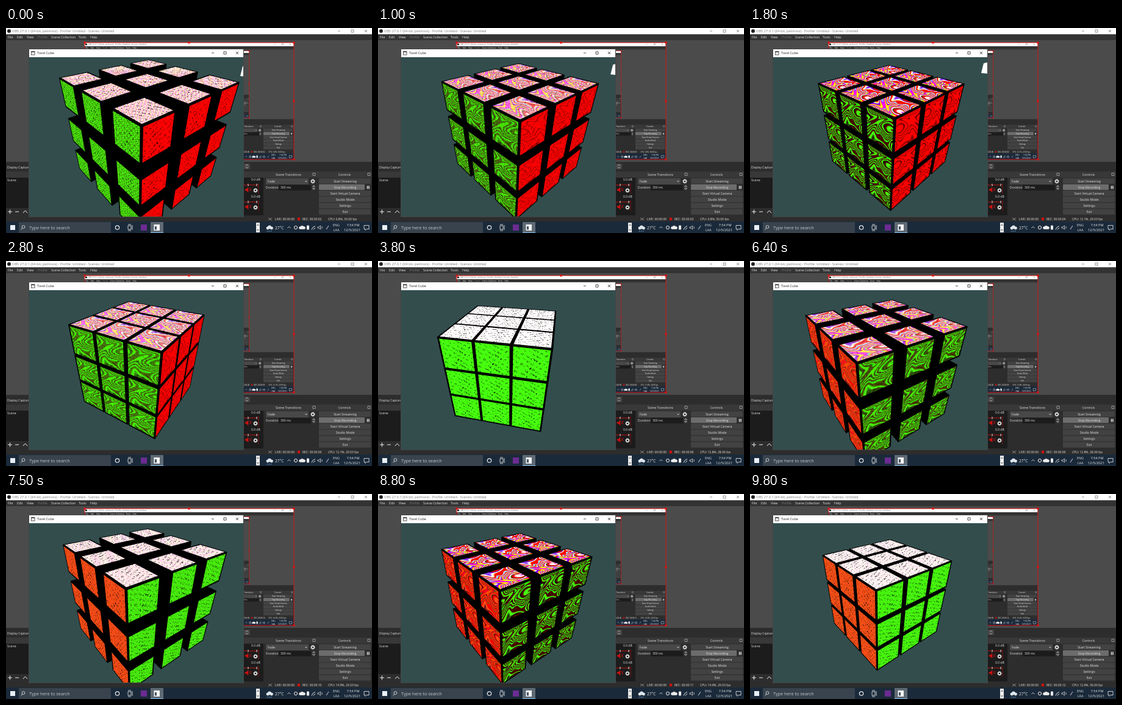
These frames come from a looping animation (600 by 337 pixels, 9.9 s). An HTML page with a canvas:

```html
<!DOCTYPE html>
<html>
<head>
<meta charset="utf-8">
<style>
html, body { margin: 0; width: 100%; height: 100%; overflow: hidden; background: #000; }
svg { position: absolute; left: 0; top: 0; display: block; font-family: "Open Sans", sans-serif; }
canvas { position: absolute; left: 38px; top: 48px; }
</style>
</head>
<body>
<svg id="desk" width="600" height="337" viewBox="0 0 600 337"></svg>
<canvas id="view" width="351" height="262"></canvas>
<script>
const LOOP = 9900, STEP = 100;

// ---------- desktop ----------
const rect = (x, y, w, h, fill, more = '') =>
  `<rect x="${x}" y="${y}" width="${w}" height="${h}" fill="${fill}" ${more}/>`;
const text = (x, y, s, size = 5.3, fill = '#e4e4e4', more = '') =>
  `<text x="${x}" y="${y}" font-size="${size}" fill="${fill}" ${more}>${s}</text>`;
const mid = (x, y, s, size, fill) => text(x, y, s, size, fill, 'text-anchor="middle"');
const line = (d, stroke = '#e4e4e4', w = 0.8, fill = 'none') =>
  `<path d="${d}" stroke="${stroke}" stroke-width="${w}" fill="${fill}"/>`;
const dot = (x, y, r, fill, more = '') => `<circle cx="${x}" cy="${y}" r="${r}" fill="${fill}" ${more}/>`;
const gear = (x, y) =>
  dot(x, y, 2.2, 'none', 'stroke="#eee" stroke-width="1.4"') +
  dot(x, y, 3.2, 'none', 'stroke="#eee" stroke-width="1" stroke-dasharray="1.3 1.2"');
const winButtons = (xs, y, c) =>
  line(`M${xs[0] - 2} ${y}h4`, c) +
  line(`M${xs[1] - 2} ${y - 2}h4v4h-4z`, c) +
  line(`M${xs[2] - 2} ${y - 2}l4 4m0 -4l-4 4`, c);

function titleBar() {
  const menu = [[3, 'File'], [18, 'Edit'], [34, 'View'], [52, 'Profile'],
    [74, 'Scene Collection'], [119, 'Tools'], [138, 'Help']];
  return rect(0, 0, 600, 10.5, '#fff') +
    dot(5, 5, 3, '#222') +
    text(10, 7.2, 'OBS 27.0.1 (64-bit, pelmora) - Profile: Untitled - Scenes: Untitled', 5.7, '#777') +
    winButtons([546, 568, 590], 5, '#777') +
    rect(0, 10.5, 600, 9.5, '#333') +
    menu.map(([x, s]) => text(x, 17, s, 5.3, s === 'Profile' ? '#777' : '#e4e4e4')).join('');
}

function mixer(y) {
  return text(402, y, '0.0 dB', 5) +
    line(`M390 ${y + 7}h24`, '#a01818', 1.2) +
    line(`M397 ${y + 5}v4M411 ${y + 5}v4`, '#ddd', 1) +
    line(`M392 ${y + 14}h2l3 -3v8l-3 -3h-2z`, '#d01010', 0.5, '#d01010') +
    line(`M399 ${y + 12}l3 5m0 -5l-3 5`, '#d01010') +
    gear(409, y + 16) + line(`M414 ${y + 4}v18`, '#7a1515', 1);
}

function docks() {
  const buttons = ['Start Streaming', 'Stop Recording', 'Start Virtual Camera', 'Studio Mode', 'Settings', 'Exit'];
  return rect(0, 220, 600, 98, '#2d2d2d') +
    rect(0, 236, 600, 10, '#383838') +
    text(2, 231, 'Display Capture', 5) +
    rect(390, 223, 10, 9, '#444') + line('M393 226.500l2 -2l2 2m-4 2l2 2l2 -2') +
    rect(0, 246, 38, 50, '#1c1c1c') + text(2, 252, 'Scene') +
    line('M3 302h7m-3.500 -3.500v7M15 302h6M28 304l3.500 -4l3.500 4', '#eee', 1) +
    rect(388, 246, 34, 62, '#1c1c1c') + mixer(251) + mixer(279) +
    mid(463, 243, 'Scene Transitions', 5.2) + mid(555, 243, 'Controls', 5.2) +
    line('M503 238.500h4v4h-4zM593 238.500h4v4h-4z', '#bbb', 0.7) +
    rect(426, 247, 70, 10, '#484848') + text(429, 254, 'Fade') +
    line('M490.500 251l1.500 2l1.500 -2') + gear(503, 252) +
    text(426, 264, 'Duration', 5) + rect(447, 258, 53, 9, '#1c1c1c') + text(450, 264.2, '300 ms', 5) +
    line('M502.500 261l2 -2.500l2 2.500zM502.500 263.500l2 2.500l2 -2.500z', '#ccc', 0.7) +
    buttons.map((s, i) => {
      const on = i === 1;
      return rect(513, 247 + i * 10.1, on ? 75 : 85, 9.2, on ? '#6c6c6c' : '#424242', 'rx="1"') +
        mid(556, 253.6 + i * 10.1, s, 5.2);
    }).join('') +
    line('M592.500 259.500v5M595 259.500v5', '#eee', 1.4) +
    line('M430 312l6 4m-6 0l6 -4', '#aaa', 0.7) + text(441, 316, 'LIVE: 00:00:00', 5) +
    dot(480, 314, 2.4, '#d01010') + text(486, 316, '', 5, '#e4e4e4', 'class="rec"') +
    text(528, 316, '', 5, '#e4e4e4', 'class="cpu"');
}

function taskbar() {
  return rect(0, 318, 600, 19, '#1b2a3a') +
    rect(7, 324, 8, 8, '#e8f0f8') +
    rect(21, 319, 151, 18, '#38434e') +
    dot(28.5, 327, 2.4, 'none', 'stroke="#ddd" stroke-width=".9"') + line('M26.800 329l-2 2.500', '#ddd', 0.9) +
    text(38, 330.6, 'Type here to search', 7.3, '#c4c8cc') +
    dot(182.500, 328, 3.2, 'none', 'stroke="#eee" stroke-width="1.2"') +
    line('M200 325h5v6h-5zM207 324v8M200 323h5M200 333h5', '#ddd', 0.9) +
    rect(221, 323, 10, 10, '#6b2c91') +
    rect(237, 319, 21, 18, '#5f6a74') + rect(237, 336, 21, 1, '#76b9ed') +
    rect(242.500, 323, 9.500, 10, '#f4f4f4') + rect(244, 326, 3, 5.500, '#456') +
    rect(410, 320, 6, 16, '#eee') + line('M411.500 325l1.500 -2l1.500 2m-3 6l1.500 2l1.500 -2', '#333') +
    [[429, 329, 2.4], [432, 327.500, 3], [435.500, 329, 2.4]].map(a => dot(...a, '#dfe6ee')).join('') +
    line('M429 333l-1 2m4 -2l-1 2m4 -2l-1 2', '#7ab6ee') +
    text(441, 330.500, '27°C', 6.500) +
    line('M461.500 329l2.500 -2.500l2.500 2.500', '#eee') +
    dot(475, 328, 2.6, 'none', 'stroke="#eee"') +
    line('M482 330.500h7a2 2 0 0 0 -1 -4a3 3 0 0 0 -5 0a2 2 0 0 0 -1 4z', '#eee', 0.6, '#eee') +
    rect(493, 324.500, 4, 7, '#eee', 'rx="1"') +
    line('M501 331.500a8 8 0 0 1 6 -6M504 331.500a5 5 0 0 1 3 -3', '#eee', 0.9) +
    line('M511 327h2l2.500 -2v6l-2.500 -2h-2zM517.500 326q2 2 0 4', '#eee', 0.7) +
    line('M525 331l4 -6', '#aab', 1.2) +
    mid(541.500, 325.8, 'ENG', 5.4) + mid(541.500, 333.500, 'LAA', 5.4) +
    mid(569, 325.8, '7:54 PM', 5.6) + mid(567.500, 333.500, '12/5/2021', 5.8) +
    line('M587 324.500h8v6h-4l-2 2v-2h-2z', '#eee', 0.8);
}

function previewFrame() {
  const knobs = [[129, 24], [300, 24], [472, 24], [472, 120], [472, 216], [300, 216], [129, 216]];
  return rect(129, 24, 343, 192, 'none', 'stroke="#e01010" stroke-width="1"') +
    knobs.map(([x, y]) => rect(x - 1.600, y - 1.600, 3.200, 3.200, '#e01010')).join('');
}

function desktop(level) {
  const mirror = level < 3
    ? `<g transform="translate(128.500 24) scale(.572)">${desktop(level + 1)}</g>` : '';
  return rect(0, 0, 600, 337, '#4b4b4b') + titleBar() + mirror + previewFrame() +
    docks() + taskbar();
}

const cubeWindow = rect(37.500, 34.500, 352, 276, '#fff', 'stroke="#444" stroke-width="1"') +
  rect(41, 38, 6.500, 6.500, '#555') + rect(42, 40, 4.500, 3.500, '#fff') +
  text(51, 43.400, 'Tovel Cube', 5.5, '#222') + winButtons([339, 359, 379], 41, '#222') +
  rect(38, 48, 351, 262, '#334d4d');

const desk = document.getElementById('desk');
desk.innerHTML = desktop(0) + cubeWindow;
const setAll = (sel, s) => desk.querySelectorAll(sel).forEach(n => { n.textContent = s; });

const LOAD = [[0, '0.8%, 30.00'], [1500, '12.1%, 29.03'], [3000, '12.8%, 28.06'],
  [6500, '14.9%, 29.03'], [9500, '12.6%, 30.00']];

function status(t) {
  const sec = Math.floor((t + 2700) / 1000);
  setAll('.rec', 'REC: 00:00:' + String(sec).padStart(2, '0'));
  setAll('.cpu', `CPU: ${LOAD.filter(r => r[0] <= t).pop()[1]} fps`);
}

// ---------- motion ----------
// time, yaw, cubie size, gap, centre x, centre y, swirl, tint
const KEYS = [
  [0, 49.5, 0.978, 0.45, 0.31, 0.13, 0, 0.8],
  [1000, 47.2, 0.98, 0.235, 0.33, 0.26, 0.5, 0.9],
  [1800, 45.5, 0.976, 0.137, 0.335, 0.33, 1, 1],
  [3800, 13, 1, 0, -0.073, 0.255, 0, 0],
  [5400, -26.5, 0.994, 0.22, -0.08, -0.1, 1.2, 1],
  [7500, -37, 0.941, 0.38, 0.14, 0.2, 0, 0.4],
  [8800, -36.7, 0.932, 0.27, 0.155, 0.18, 1, 1],
  [9800, -38, 0.9, 0.1, 0.151, 0.22, 0, 0.2],
];
const slope = (i, k) => (KEYS[i + 1][k] - KEYS[i][k]) / (KEYS[i + 1][0] - KEYS[i][0]);

function tangent(i, k) {
  if (i === 0) return slope(0, k);
  if (i === KEYS.length - 1) return slope(i - 1, k);
  const a = slope(i - 1, k), b = slope(i, k);
  return a * b <= 0 ? 0 : 2 * a * b / (a + b);
}

function pose(t) {
  let i = 0;
  while (i < KEYS.length - 2 && t >= KEYS[i + 1][0]) i++;
  const a = KEYS[i], b = KEYS[i + 1], h = b[0] - a[0], s = (t - a[0]) / h;
  const e = s * s * (3 - 2 * s);
  return a.map((v, k) => v + (b[k] - v) * e +
    h * s * (1 - s) * (tangent(i, k) * (1 - s) - tangent(i + 1, k) * s));
}

// ---------- sticker textures ----------
const N = 72;
const { sin, cos, min, max, abs } = Math;
const sat = v => max(0, min(1, v));
const sticker = (...rgb) => {
  const c = document.createElement('canvas');
  c.width = c.height = N;
  const g = c.getContext('2d');
  return { c, g, rgb, img: g.createImageData(N, N) };
};
const RED = sticker(252, 2, 2), ORANGE = sticker(244, 82, 24);
const WHITE = sticker(255, 252, 252), GREEN = sticker(70, 255, 14);
const SKINS = [RED, ORANGE, WHITE, GREEN];

function paintSkins(w, tint) {
  const mix = min(1, w);
  for (let p = 0; p < N * N; p++) {
    const x = (p % N) / N, y = Math.floor(p / N) / N;
    const u = x + w * 0.16 * sin(6 * y + 2 * sin(5 * x + 1));
    const v = y + w * 0.1 * sin(7 * x + 2.5 * sin(4 * y));
    const n = sin(47 * u + 2 * sin(29 * v)) + sin(45 * v + 2 * sin(33 * u));
    const open = sat(0.7 + 3 * sin(21 * u + 46 * v));
    const ink = 1 - 0.85 * open * sat(1.8 - 4.5 * abs(n - 0.8));
    const fine = sin(71 * u + 3 * sin(60 * v)), other = sin(65 * v + 3 * sin(57 * u));
    const calm = [ink, ink * (1 - tint * 0.5 * sat(fine * 3)), ink * (1 - tint * 0.45 * sat(other * 3))];
    // thin bands flowing mostly sideways
    const q = 46 * v + 9 * sin(3 * u + 2 * sin(6 * v)) + 6 * sin(9 * u + 3 * sin(5 * v));
    const swirl = [sat(1.5 + 1.1 * sin(q * 0.7 + 1)), sat(0.42 + sin(q)), sat(0.55 + sin(q * 0.8 + 2.4))];
    for (const s of SKINS) {
      for (let k = 0; k < 3; k++) s.img.data[p * 4 + k] = s.rgb[k] * (calm[k] + (swirl[k] - calm[k]) * mix);
      s.img.data[p * 4 + 3] = 255;
    }
  }
  SKINS.forEach(s => s.g.putImageData(s.img, 0, 0));
}

// ---------- cube ----------
const ctx = document.getElementById('view').getContext('2d');
const FOCAL = 316, DIST = 6.85, PITCH = 34 * Math.PI / 180;
const SP = sin(PITCH), CP = cos(PITCH);
const FACES = [[0, 1, RED], [0, -1, ORANGE], [1, 1, WHITE], [1, -1], [2, 1, GREEN], [2, -1]];
const SIDES = [[-1, -1], [1, -1], [1, 1], [-1, 1]];

function trace(pts) {
  ctx.beginPath();
  pts.forEach(p => ctx.lineTo(p[0], p[1]));
  ctx.closePath();
}

function texture(pts, skin) {
  const [a, b, c, d] = pts;
  const avg = k => (a[k] + b[k] + c[k] + d[k]) / 4;
  const ex = k => (b[k] - a[k] + c[k] - d[k]) / 2;
  const ey = k => (d[k] - a[k] + c[k] - b[k]) / 2;
  ctx.save();
  trace(pts);
  ctx.clip();
  ctx.transform(ex(0), ex(1), ey(0), ey(1), avg(0), avg(1));
  ctx.drawImage(skin.c, -0.6, -0.6, 1.2, 1.2);
  ctx.restore();
}

function drawCube(yaw, size, gap, cx, cy) {
  const s = sin(yaw * Math.PI / 180), c = cos(yaw * Math.PI / 180);
  const turn = ([r, y, n]) => {
    const z = r * s + n * c;
    return [r * c - n * s, y * CP - z * SP, -(y * SP + z * CP)];
  };
  const place = v => {
    const [x, y, z] = turn(v);
    return [x + cx, y + cy, z + DIST];
  };
  const project = v => {
    const [x, y, z] = place(v);
    return [175.5 + FOCAL * x / z, 131 - FOCAL * y / z];
  };
  const pitch = size * (1 + gap), half = size / 2;
  const cubies = [];
  for (let i = 0; i < 27; i++) {
    const cell = [i % 3 - 1, Math.floor(i / 3) % 3 - 1, Math.floor(i / 9) - 1];
    const pos = cell.map(v => v * pitch);
    cubies.push({ cell, pos, far: Math.hypot(...place(pos)) });
  }
  cubies.sort((a, b) => b.far - a.far);
  for (const { cell, pos } of cubies) {
    for (const [axis, sign, skin] of FACES) {
      const normal = [0, 0, 0];
      normal[axis] = sign;
      const eye = place(pos.map((v, k) => v + normal[k] * half));
      if (turn(normal).reduce((sum, v, k) => sum + v * eye[k], 0) >= 0) continue;
      const across = axis === 0 ? 2 : 0, along = axis === 1 ? 2 : 1;
      const quad = r => SIDES.map(([a, b]) => {
        const v = pos.slice();
        v[axis] += sign * half;
        v[across] += a * r;
        v[along] += b * r;
        return project(v);
      });
      trace(quad(half));
      ctx.fillStyle = ctx.strokeStyle = '#000';
      ctx.lineWidth = 0.6;
      ctx.fill();
      ctx.stroke();
      if (skin && cell[axis] === sign) texture(quad(half * 0.91), skin);
    }
  }
}

function drawLamp(t) {
  if (t > 2500) return;
  const k = t < 1800 ? 1 - t / 1800 : (t - 1800) / 300;
  ctx.fillStyle = '#fff';
  trace([[345, 10], [357, 7], [361, 28], [341, 26]].map(([x, y]) => [x + 5 * k, y + 5 * k]));
  ctx.fill();
}

function render(t) {
  const [, yaw, size, gap, cx, cy, swirl, tint] = pose(t);
  ctx.fillStyle = '#334d4d';
  ctx.fillRect(0, 0, 351, 262);
  drawLamp(t);
  paintSkins(max(0, swirl), sat(tint));
  drawCube(yaw, size, max(0, gap), cx, cy);
  status(t);
}

let start = null, shown = -1;
function tick(now) {
  if (start === null) start = now;
  const t = Math.floor(((now - start) % LOOP) / STEP) * STEP;
  if (t !== shown) render(shown = t);
  requestAnimationFrame(tick);
}
render(0);
requestAnimationFrame(tick);
</script>
</body>
</html>
```
